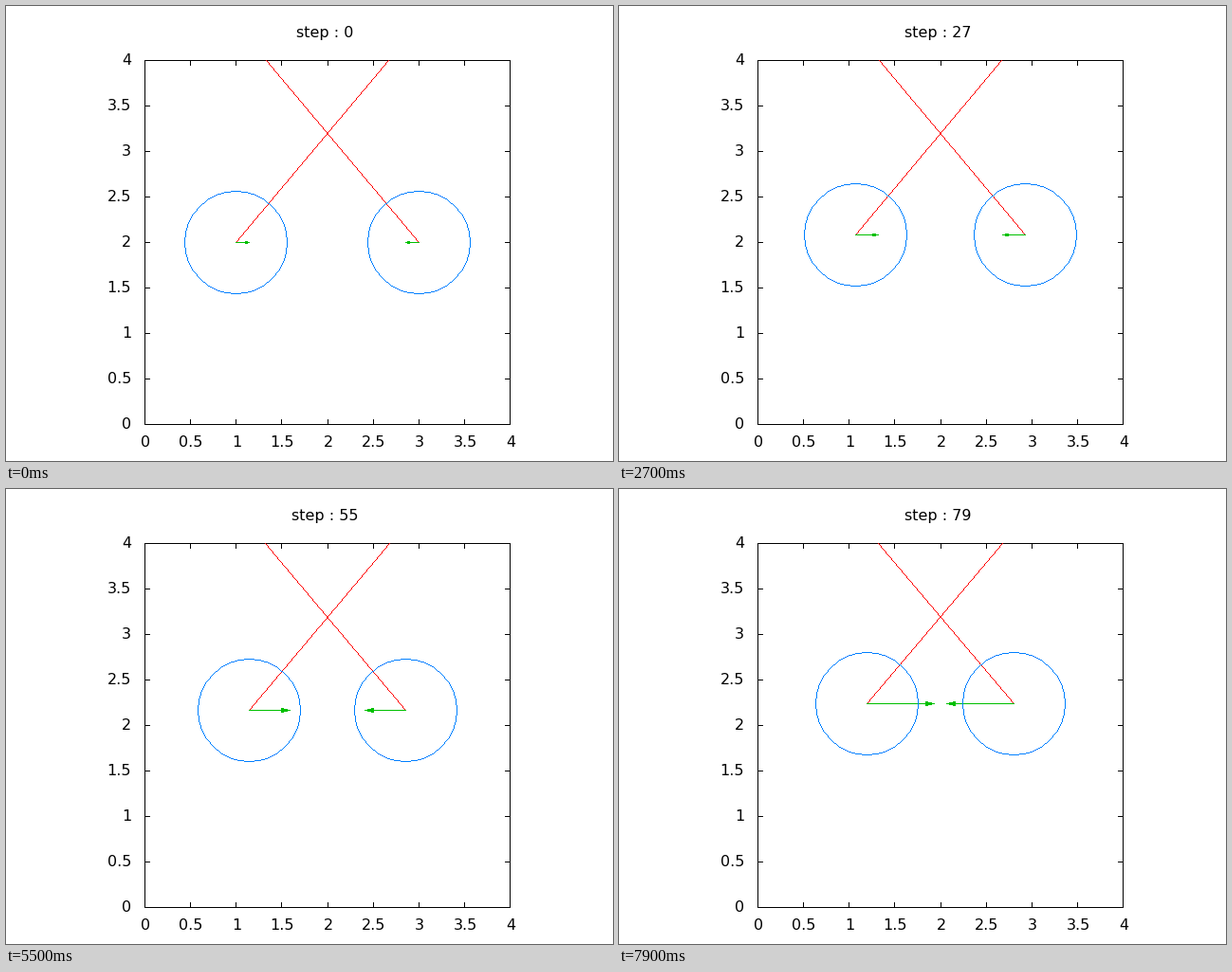
A matplotlib script that plays this animation: 640 by 480 pixels, repeating every 8000 ms.

```python
import numpy as np
import matplotlib.pyplot as plt
from matplotlib.animation import FuncAnimation
from matplotlib.collections import PolyCollection

plt.rcParams["font.family"] = "DejaVu Sans"

W, H, DPI = 640, 480, 100
STEPS, INTERVAL = 80, 100
LEFT, RIGHT, TOP, BOTTOM = 146, 531, 57, 441
SX, SY = (RIGHT - LEFT) / 4, (BOTTOM - TOP) / 4
RED, GREEN, BLUE = "#ff0000", "#00c000", "#0080ff"
DT, CUTOFF = 0.001, 2.5
RADIUS = 2 ** (1 / 6) / 2
TIC = 5
FONT = 16 * 72 / DPI


def nearest(v):
    return int(np.floor(v + 0.5))


def px(x):
    return nearest(LEFT + SX * x)


def py(y):
    return nearest(BOTTOM - SY * y)


def lj(r):
    return 24 * (1 / r ** 7 - 2 / r ** 13)


def pull(x):
    """Attraction toward x = 2, shifted to vanish at the cutoff."""
    return lj(4 - 2 * x) - lj(CUTOFF)


def simulate():
    x, y, vx, vy = 1.0, 2.0, 2.5, 3.0
    states = []
    for _ in range(STEPS):
        f = pull(x)
        states.append((x, y, vx, vy, f))
        x += vx * DT + f * DT ** 2 / 2
        y += vy * DT
        vx += (f + pull(x)) * DT / 2
    return states


def line(x0, y0, x1, y1):
    """Pixels of a hard-edged line, one per step of the longer axis."""
    n = max(abs(x1 - x0), abs(y1 - y0), 1)
    t = np.arange(n + 1) / n
    xs = np.floor(x0 + (x1 - x0) * t + 0.5)
    ys = np.floor(y0 + (y1 - y0) * t + 0.5)
    return np.column_stack([xs, ys])


def circle(cx, cy, sides=32):
    a = np.linspace(0, 2 * np.pi, sides + 1)
    xs = cx + np.rint(RADIUS * SX * np.cos(a)).astype(int)
    ys = cy + np.rint(RADIUS * SX * np.sin(a)).astype(int)
    return np.vstack([line(*p) for p in zip(xs, ys, xs[1:], ys[1:])])


def arrow(x0, y, x1):
    size = min(0.3 * abs(x1 - x0), 2 * TIC)
    length = int(size * np.cos(np.radians(15)))
    half = int(size * np.sin(np.radians(15)))
    back = -1 if x1 > x0 else 1
    parts = [line(x0, y, x1, y)]
    for i in range(length + 1):
        h = nearest(half * i / length)
        x = x1 + back * i
        parts.append(line(x, y - h, x, y + h))
    return np.vstack(parts)


def mirror(p):
    return np.column_stack([LEFT + RIGHT - p[:, 0], p[:, 1]])


def squares(p):
    p = np.unique(p, axis=0)
    unit = np.array([[0, 0], [1, 0], [1, 1], [0, 1]])
    return p[:, None, :] + unit


fig = plt.figure(figsize=(W / DPI, H / DPI), dpi=DPI, facecolor="white")
ax = fig.add_axes([0, 0, 1, 1])
ax.set(xlim=(0, W), ylim=(H, 0))
ax.axis("off")


def layer(color, z):
    c = PolyCollection([], facecolors=color, edgecolors="none",
                       linewidths=0, zorder=z)
    c.set_snap(False)
    return ax.add_collection(c, autolim=False)


def label(x, y, s, ha="center"):
    return ax.text(x, y, s, fontsize=FONT, ha=ha, va="baseline")


def draw_frame():
    parts = [line(LEFT, TOP, RIGHT, TOP), line(LEFT, BOTTOM, RIGHT, BOTTOM),
             line(LEFT, TOP, LEFT, BOTTOM), line(RIGHT, TOP, RIGHT, BOTTOM)]
    for v in np.arange(0, 4.5, 0.5):
        x, y = px(v), py(v)
        parts += [line(x, BOTTOM, x, BOTTOM - TIC), line(x, TOP, x, TOP + TIC),
                  line(LEFT, y, LEFT + TIC, y), line(RIGHT, y, RIGHT - TIC, y)]
        label(x + 1, 465, f"{v:g}")
        label(132, y + 5, f"{v:g}", ha="right")
    layer("black", 1).set_verts(squares(np.vstack(parts)))


draw_frame()
rings, rays, forces = layer(BLUE, 4), layer(RED, 2), layer(GREEN, 3)
title = label(336, 33, "")
states = simulate()


def update(n):
    x, y, vx, vy, f = states[n]
    cx, cy = px(x), py(y)
    exit_x = x + vx * (4 - y) / vy
    shapes = ((rings, circle(cx, cy)),
              (rays, line(cx, cy, px(exit_x), TOP)),
              (forces, arrow(cx, cy, px(x + f))))
    for art, p in shapes:
        art.set_verts(squares(np.vstack([p, mirror(p)])))
    title.set_text(f"step : {n}")
    return rings, rays, forces, title


anim = FuncAnimation(fig, update, frames=STEPS, interval=INTERVAL,
                     repeat=True, repeat_delay=0, blit=False)
plt.show()
```
